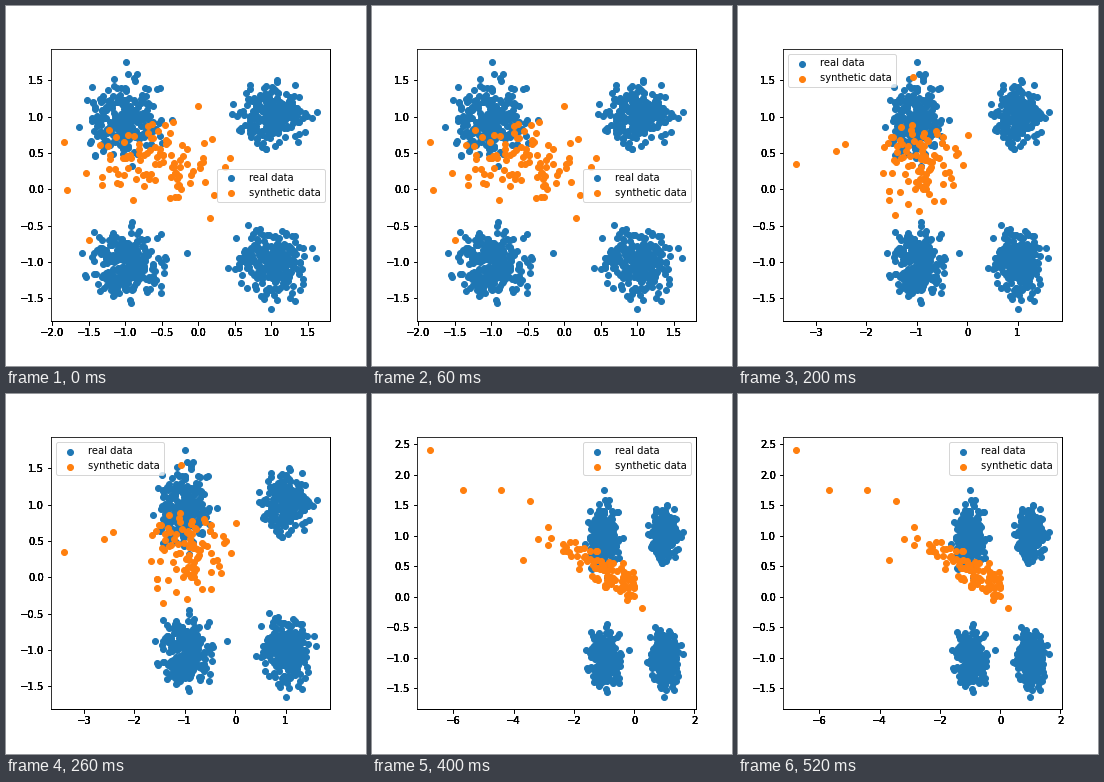
Animation, 360 px wide and 360 px high, one loop 0.6 s. Source, as a matplotlib script:

```python
import numpy as np
import matplotlib.pyplot as plt
from matplotlib.animation import FuncAnimation

rng = np.random.default_rng(7)


def cloud(n, reach):
    """n standard normal points no farther than reach from the middle."""
    pts = rng.normal(size=(6 * n, 2))
    return pts[np.hypot(*pts.T) < reach][:n]


def cluster(center, spread):
    return center + spread * cloud(250, 2.75)


def samples(center, spread, slope, skew, outliers):
    """Points around a sloping line, with a tail to the left where skewed."""
    u, v = cloud(100 - len(outliers), 2.3).T
    dx = spread[0] * (u - skew * (u * u - 1))
    core = np.column_stack([dx, slope * dx + spread[1] * v]) + center
    return np.vstack([core, outliers])


real = np.vstack([
    cluster((-1, 1), (.25, .26)),
    cluster((1, 1), (.21, .2)),
    cluster((-1, -1), (.24, .23)),
    cluster((1, -1), (.23, .23)),
    [(-.99, 1.755), (1.63, 1.06), (1, -1.64), (-.16, -.88)],
])

# Synthetic samples after each training stage, with the legend position
stages = [
    ("center right", samples((-.58, .38), (.46, .28), -.1, 0, [
        (-1.845, .65), (-1.8, -.01), (-1.5, -.7), (0, 1.14), (.44, .43),
        (.16, -.4)])),
    ("upper right", samples((-.38, .24), (.37, .27), 0, 0, [
        (-1, 1.85), (-1.77, .45), (-1.51, 1.09), (.24, 1.44), (.47, .56),
        (-.67, -.79)])),
    ("upper left", samples((-.9, .32), (.42, .28), 0, 0, [
        (-3.4, .35), (-2.6, .53), (-2.43, .62), (-1.08, 1.54), (-1.44, -.35),
        (.01, .75)])),
    ("upper left", samples((-1.1, .42), (.68, .23), -.16, .22, [
        (-5.4, 1.35), (-4.43, .84), (-3.93, 1.22), (-2.57, 1.17),
        (-2.13, -.37), (0, .07)])),
    ("upper right", samples((-1.1, .47), (.9, .15), -.28, .25, [
        (-6.78, 2.41), (-5.69, 1.74), (-4.43, 1.74), (-3.47, 1.57),
        (-3.67, .6), (.27, -.18)])),
]

fig = plt.figure(figsize=(5, 5), dpi=72)
fig.subplots_adjust(left=.125, right=.9, bottom=.125, top=.88)
# Stacked axes fill in the soft edges of the tick labels
ax = fig.add_subplot()
for _ in range(4):
    ax = fig.add_subplot(sharex=ax, sharey=ax)
ax.scatter(*real.T, label="real data")
fake = ax.scatter([], [], label="synthetic data")


def draw(i):
    loc, pts = stages[min(i, len(stages) - 1)]
    fake.set_offsets(pts)
    both = np.vstack([real, pts])
    low, high = both.min(axis=0), both.max(axis=0)
    pad = 0.05 * (high - low)
    ax.set_xlim(low[0] - pad[0], high[0] + pad[0])
    ax.set_ylim(low[1] - pad[1], high[1] + pad[1])
    ax.legend(loc=loc)


# The last stage is held for two steps
anim = FuncAnimation(fig, draw, frames=len(stages) + 1, interval=100,
                     init_func=lambda: draw(0), repeat=True, repeat_delay=0)
plt.show()
```
